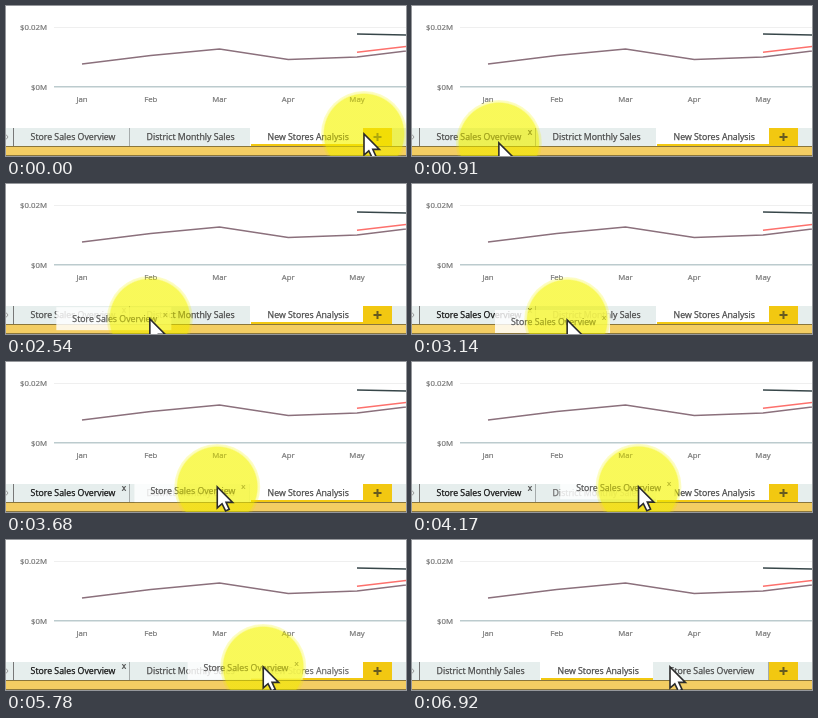
Animation of 400x150 px, one loop 8000 ms. Source, as an HTML page with a canvas:

```html
<!DOCTYPE html>
<html lang="en">
<head>
<meta charset="utf-8">
<title>Reordering report tabs</title>
<style>
  html, body { margin: 0; width: 100%; height: 100%; overflow: hidden; background: #fff; }
  canvas { display: block; }
</style>
</head>
<body>
<canvas id="stage" width="400" height="150"></canvas>
<script>
const ctx = document.getElementById('stage').getContext('2d');
const LOOP = 8000;
const GOLD = '#f2c811', BLACK = '#111', DARK = '#4a4a4a', MUTED = '#686868';

const store = { label: 'Store Sales Overview', width: 116 };
const district = { label: 'District Monthly Sales', width: 121 };
const fresh = { label: 'New Stores Analysis', width: 112 };

const START = { x: 358, y: 128 };
const moves = [
  { from: 230, to: 410, x: 185, y: 136 },   // to the left
  { from: 610, to: 910, x: 87, y: 137 },
  { from: 910, to: 1030, x: 79, y: 131 },   // rest on the first tab
  { from: 1260, to: 1420, x: 75, y: 129 },
  { from: 2140, to: 2780, x: 155, y: 136 }, // drag to the right
  { from: 3140, to: 3890, x: 216, y: 124 },
  { from: 3920, to: 4420, x: 230, y: 125 },
  { from: 5170, to: 5900, x: 258, y: 127 }
];

const easeOut = k => 1 - (1 - k) ** 2;

function pointerAt(t) {
  let { x, y } = START;
  for (const move of moves) {
    const progress = (t - move.from) / (move.to - move.from);
    const k = easeOut(Math.min(1, Math.max(0, progress)));
    x += (move.x - x) * k;
    y += (move.y - y) * k;
  }
  return { x, y };
}

function rect(x, y, w, h, color) {
  ctx.fillStyle = color;
  ctx.fillRect(x, y, w, h);
}

function line(points, color, width = 1.5) {
  ctx.beginPath();
  points.forEach(([x, y]) => ctx.lineTo(x, y));
  ctx.strokeStyle = color;
  ctx.lineWidth = width;
  ctx.stroke();
}

// A hairline stroke gives the letters a medium weight
function text(str, x, y, size, color, align = 'left') {
  ctx.font = `${size}px "Open Sans", "Noto Sans", sans-serif`;
  ctx.textAlign = align;
  ctx.fillStyle = ctx.strokeStyle = color;
  ctx.lineWidth = size / 35;
  ctx.fillText(str, x, y);
  ctx.strokeText(str, x, y);
}

function drawChart() {
  rect(48, 21, 352, 1, '#efefef');
  rect(48, 80, 352, 1.5, '#bccbce');
  const monthX = i => 76 + i * 68.75;
  const label = (str, x, y, align) => text(str, x, y, 7.8, '#777', align);
  label('$0.02M', 41, 24, 'right');
  label('$0M', 41, 84, 'right');
  ['Jan', 'Feb', 'Mar', 'Apr', 'May'].forEach((month, i) => label(month, monthX(i), 96, 'center'));
  line([[351, 28], [400, 29]], '#374649');
  line([[351, 46.2], [400, 40.6]], '#fd706c');
  line([58, 49.5, 43, 53.5, 51, 42.5].map((y, i) => [monthX(i), y]), '#8b707c');
}

function drawTabs(t) {
  const dropped = t >= 6320;
  const order = dropped ? [district, fresh, store] : [store, district, fresh];
  const dropTarget = t < 3500 || t >= 6060 ? null : t < 5550 ? district : fresh;
  const held = dropped ? t >= 6420 && t < 6920 : t >= 2980;
  const closable = dropped ? held : t >= 850;

  rect(0, 122, 400, 18, '#e6eeed');
  line([[0, 128.5], [2, 131], [0, 133.5]], '#999', 1);
  rect(7, 122, 1, 18, '#777');
  let left = 8;
  for (const tab of order) {
    const { label, width } = tab;
    if (tab === fresh) {
      rect(left - 1, 122, width + 1, 18, '#fff');
      rect(left, 138, width, 2, GOLD);
    } else {
      rect(left + width - 1, 122, 1, 18, '#a5abab');
    }
    const color = tab === store && held ? BLACK : tab === dropTarget ? MUTED : DARK;
    text(label, left + 16.6, 134, 8.75, color);
    if (tab === store && closable) text('x', left + 110, 129, 8.5, '#444', 'center');
    left += width;
  }

  rect(357, 122, 29, 18, GOLD);
  rect(367.5, 130, 8, 2, '#665a20');
  rect(370.5, 127, 2, 8, '#665a20');
  rect(0, 140, 400, 10, '#f3cd63');
  for (const y of [140, 149]) rect(0, y, 400, 1, '#8a763c');
}

function drawDraggedTab({ x, y }) {
  const left = x - 72;
  rect(left, y - 10, 115, 23, 'rgba(255,255,255,.82)');
  text(store.label, left + 16, y + 4.5, 8.75, '#555');
  text('x', left + 109, y - 0.5, 8, '#777', 'center');
}

function drawHighlight({ x, y }) {
  const radius = 43;
  const glow = ctx.createRadialGradient(x, y, 0, x, y, radius);
  glow.addColorStop(0.92, '#f5f500');
  glow.addColorStop(0.95, 'rgba(245,245,0,.4)');
  glow.addColorStop(1, 'rgba(245,245,0,.25)');
  ctx.fillStyle = glow;
  ctx.beginPath();
  ctx.arc(x, y, radius, 0, Math.PI * 2);
  for (const [mode, alpha] of [['multiply', 0.3], ['source-over', 0.5]]) {
    ctx.globalCompositeOperation = mode;
    ctx.globalAlpha = alpha;
    ctx.fill();
  }
  ctx.globalAlpha = 1;
}

function drawPointer({ x, y }) {
  const outline = [[0, 0], [0, 21], [4.8, 16.8], [8.3, 24], [12, 22.4], [8.8, 15.4], [15.4, 15.4]];
  ctx.beginPath();
  outline.forEach(([dx, dy]) => ctx.lineTo(x + dx, y + dy));
  ctx.closePath();
  ctx.fillStyle = '#fff';
  ctx.fill();
  ctx.strokeStyle = '#2b2b2b';
  ctx.lineWidth = 1.6;
  ctx.stroke();
}

function draw(now) {
  const t = now % LOOP;
  const pointer = pointerAt(t);
  rect(0, 0, 400, 150, '#fff');
  drawChart();
  drawTabs(t);
  // The dragged tab trails behind the pointer
  if (t >= 2300 && t < 6060) drawDraggedTab(pointerAt(t - 170));
  if (t < 6620) drawHighlight(pointer);
  drawPointer(pointer);
  requestAnimationFrame(draw);
}
requestAnimationFrame(draw);
</script>
</body>
</html>
```
